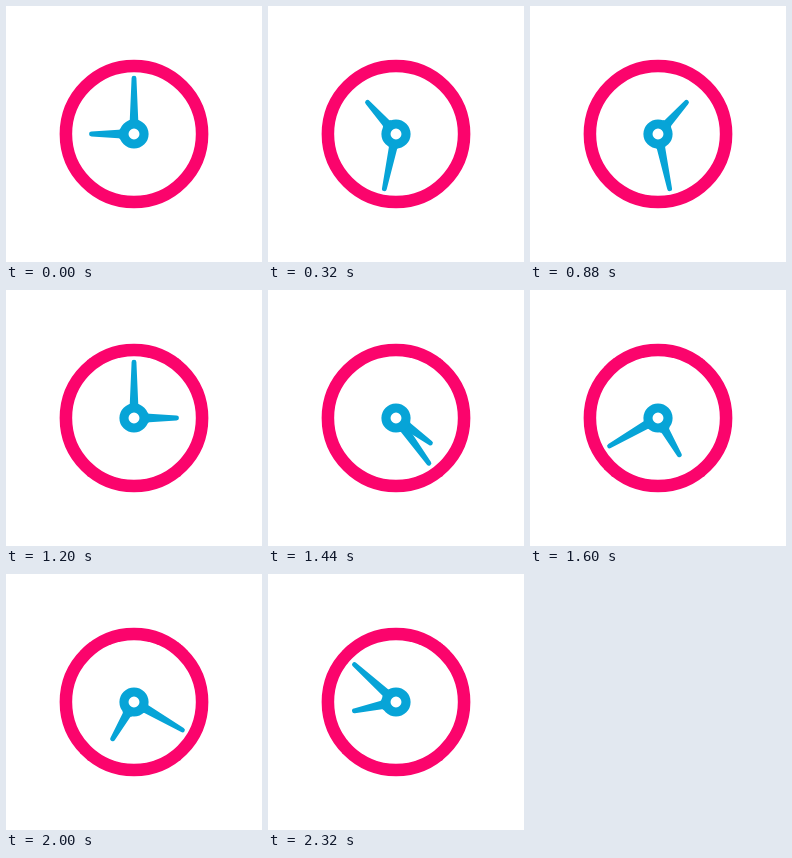
These frames come from a looping animation (256x256 px, 2.4 s). An HTML page:

```html
<!DOCTYPE html>
<html lang="en">
<head>
<meta charset="utf-8">
<title>Clock</title>
<style>
  html, body { margin: 0; height: 100%; overflow: hidden; background: #fff; }
  svg { display: block; width: 100%; height: 100%; }
</style>
</head>
<body>
<svg viewBox="0 0 256 256">
  <g transform="translate(128 128) scale(1.792)" fill="#07a4d7">
    <circle r="38" fill="none" stroke="#fb046c" stroke-width="7"/>
    <path id="minute" d="M-2.78-6V-7.49Q-2.37-7.7-2.35-8.1L-1.34-31.22A1.34 1.34 0 0 1 1.34-31.22L2.35-8.1Q2.37-7.7 2.78-7.49V-6Z"/>
    <path id="hour" d="M-3.09-6V-7.55Q-2.39-7.9-2.34-8.56L-1.37-23.71A1.37 1.37 0 0 1 1.37-23.71L2.34-8.56Q2.39-7.9 3.09-7.55V-6Z"/>
    <circle r="5.6" fill="none" stroke="#07a4d7" stroke-width="5.1"/>
  </g>
</svg>
<script>
  const LOOP = 2400, STEP = 80;
  const hour = document.getElementById('hour');
  const minute = document.getElementById('minute');
  const turn = (hand, deg) => hand.setAttribute('transform', `rotate(${deg % 360})`);

  function draw(now) {
    // The hands tick once per STEP; the minute hand turns four times per loop.
    const t = Math.floor((now % LOOP) / STEP) * STEP / LOOP;
    turn(hour, 270 + 360 * t);
    turn(minute, 1440 * t);
  }

  function tick() {
    draw(performance.now());
    requestAnimationFrame(tick);
  }

  draw(0);
  requestAnimationFrame(tick);
</script>
</body>
</html>
```
